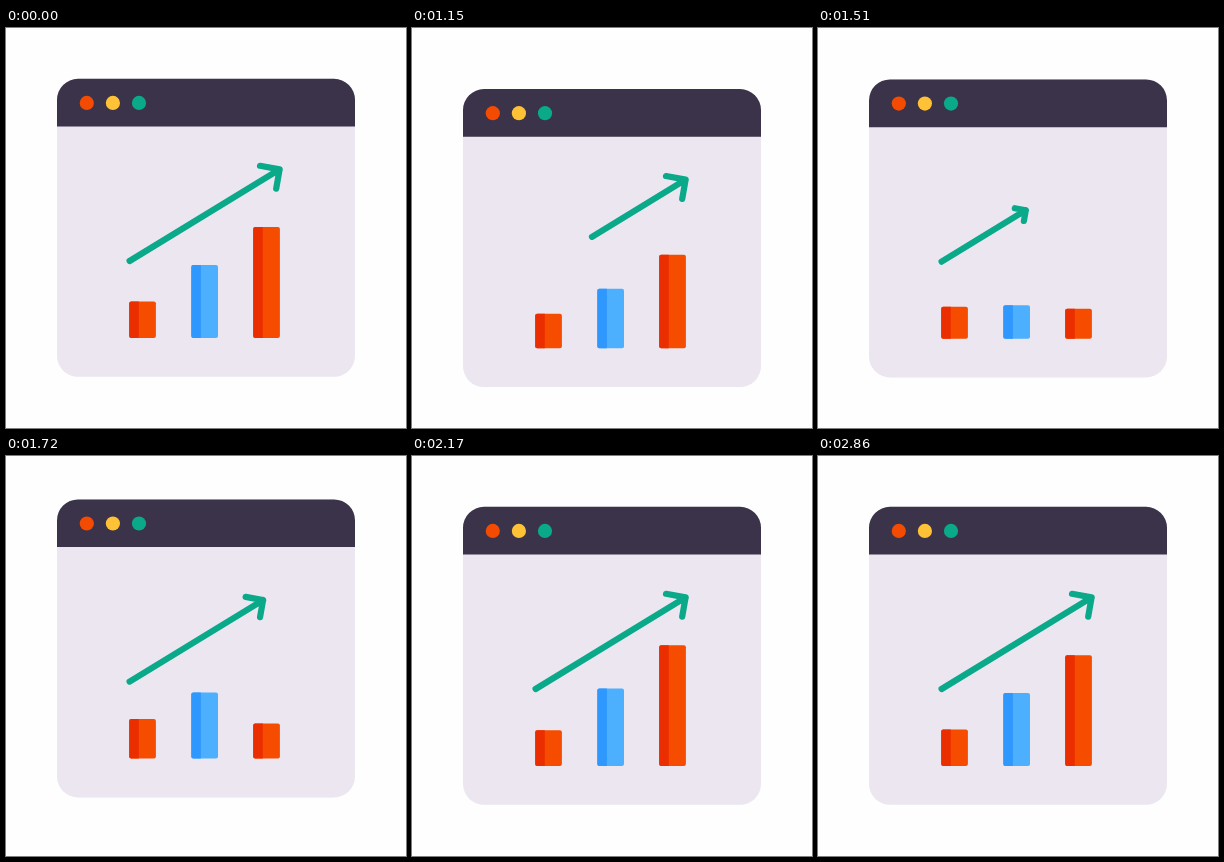
These frames come from a looping animation (400x400 px, 2.95 s). An HTML page:

```html
<!DOCTYPE html>
<html lang="en">
<head>
<meta charset="utf-8">
<title>Growth chart</title>
<style>
html, body { margin: 0; width: 100%; height: 100%; overflow: hidden; background: #fefefe; }
svg { display: block; width: 100vw; height: 100vh; }
#arrow { fill: none; stroke: #09a98a; stroke-width: 6.2; stroke-linecap: round; stroke-linejoin: round; }
</style>
</head>
<body>
<svg viewBox="0 0 400 400">
  <g id="win">
    <rect x="51" y="50.8" width="298" height="298" rx="21" fill="#ebe6f0"/>
    <path d="M51 98.5V71.8a21 21 0 0 1 21-21H328a21 21 0 0 1 21 21V98.5z" fill="#3b3349"/>
    <circle cx="80.8" cy="74.9" r="7.1" fill="#f44b02"/>
    <circle cx="106.9" cy="74.9" r="7.1" fill="#ffc236"/>
    <circle cx="133" cy="74.9" r="7.1" fill="#09a98a"/>
    <g id="bars"></g>
    <path id="arrow"/>
  </g>
</svg>
<script>
const LOOP = 2950, START = 1030, STEP = 30, LAST = 2860;
const BASE = 310;

// Tracks are [time, value] keys joined by smooth easing.
const DROP = [[1000, 0], [1240, 15], [1695, -7.5], [2085, 0]];
const BARS = [
  { x: 123.2, light: '#f54c00', dark: '#ea2e00',
    keys: [[1000, 36.5], [1400, 30], [1850, 42], [2130, 35.8], [2450, 36.5]] },
  { x: 185.3, light: '#4cb0ff', dark: '#2f98ff',
    keys: [[1000, 73], [1400, 30], [1440, 30], [1928, 89], [2380, 68], [2700, 73]] },
  { x: 247.2, light: '#f54c00', dark: '#ea2e00',
    keys: [[1000, 111], [1500, 30], [1660, 30], [2080, 124], [2400, 107.5], [2950, 111]] }
];
const TAIL = [123.6, 233], TIP = [273.6, 141.4];
const ARMS = [[-19.6, -3.6], [-3.4, 19.2]];
const LEAVE = [[1000, 0], [1360, 1]];
const FOLD = [[1160, 1], [1400, 0]];

const clamp = p => Math.min(1, Math.max(0, p));
const smooth = p => p * p * (3 - 2 * p);

function track(keys, t) {
  let [t0, v0] = keys[0];
  for (const [t1, v1] of keys) {
    if (t < t1) return t <= t0 ? v0 : v0 + (v1 - v0) * smooth((t - t0) / (t1 - t0));
    [t0, v0] = [t1, v1];
  }
  return v0;
}

// cubic-bezier(.4, 0, .2, 1)
function glide(p) {
  let lo = 0, hi = 1;
  for (let i = 0; i < 20; i++) {
    const m = (lo + hi) / 2, n = 1 - m;
    if (1.2 * n * n * m + 0.6 * n * m * m + m ** 3 < p) lo = m; else hi = m;
  }
  return smooth(lo);
}

const onLine = p => TAIL.map((a, i) => a + (TIP[i] - a) * p);

function arrowPath(from, to, arm) {
  const a = onLine(from), b = onLine(to);
  const [l, r] = ARMS.map(d => d.map((v, i) => b[i] + v * arm));
  return `M${a}L${b}M${l}L${b}L${r}`;
}

const win = document.getElementById('win');
const arrow = document.getElementById('arrow');
const group = document.getElementById('bars');

function addPath(fill) {
  const el = document.createElementNS('http://www.w3.org/2000/svg', 'path');
  el.setAttribute('fill', fill);
  return group.appendChild(el);
}
for (const bar of BARS) {
  bar.body = addPath(bar.light);
  bar.edge = addPath(bar.dark);
}

function drawBar(bar, t) {
  const h = track(bar.keys, t), x = bar.x, top = BASE - h;
  bar.body.setAttribute('d', `M${x + 2} ${top}h22.7a2 2 0 0 1 2 2v${h - 4}a2 2 0 0 1-2 2h-22.7a2 2 0 0 1-2-2v${4 - h}a2 2 0 0 1 2-2z`);
  bar.edge.setAttribute('d', `M${x + 2} ${top}h7.6v${h}h-7.6a2 2 0 0 1-2-2v${4 - h}a2 2 0 0 1 2-2z`);
}

function draw(t) {
  win.setAttribute('transform', `translate(0 ${track(DROP, t)})`);
  for (const bar of BARS) drawBar(bar, t);

  const gone = track(LEAVE, t), arm = track(FOLD, t);
  const grown = glide(clamp((t - 1185) / 865));
  let d = '';
  if (gone < 1 || arm > 0) d += arrowPath(gone, 1, arm);
  if (t > 1185) d += arrowPath(0, grown, grown);
  arrow.setAttribute('d', d);
}

const began = performance.now();
function frame() {
  const t = Math.max(0, performance.now() - began) % LOOP;
  const held = t < START ? 0 : Math.min(LAST, START + Math.floor((t - START) / STEP) * STEP);
  draw(held);
  requestAnimationFrame(frame);
}
frame();
</script>
</body>
</html>
```
